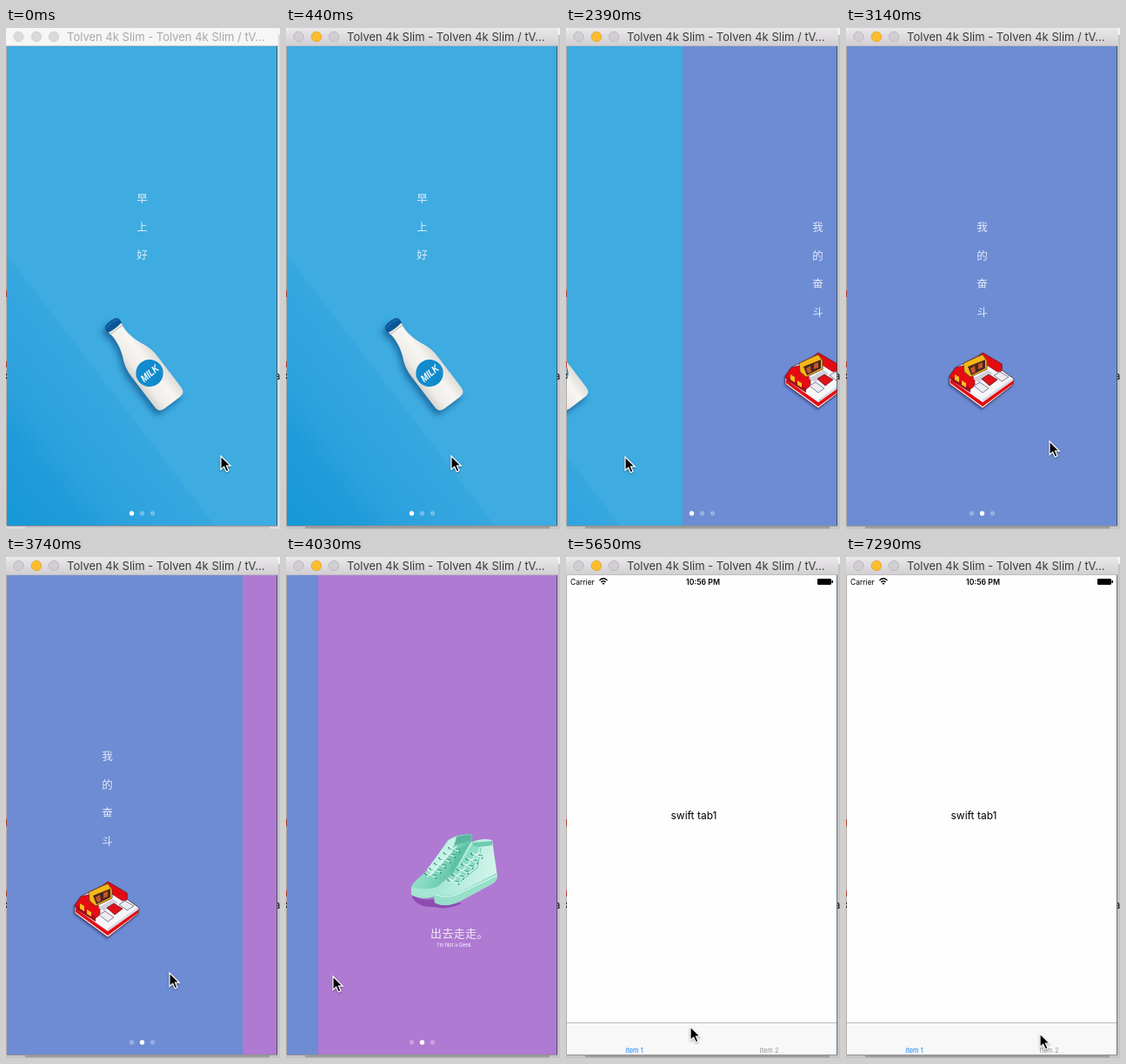
Recreate the animation shown at these times as an HTML page. Size 315 by 577 pixels, loop 8 s.

```html
<!DOCTYPE html>
<html lang="zh">
<head>
<meta charset="utf-8">
<title>Guide pages</title>
<style>
  html, body { margin: 0; width: 100%; height: 100%; overflow: hidden; background: #fff; }
  svg { display: block; width: 100vw; height: 100vh; }
  text { font-family: Inter, "Noto Sans", sans-serif; }
  .cjk { font-family: "Noto Sans CJK SC", "Noto Sans CJK", sans-serif; font-weight: 100; fill: #fff; fill-opacity: .82; }
  .mid { text-anchor: middle; }
  .bottle { filter: drop-shadow(-3px 5px 3px rgba(0, 55, 110, .5)); }
  .console { filter: drop-shadow(-1px 2px 1px rgba(30, 45, 100, .45)); }
  .pointer { filter: drop-shadow(0 1px 1px rgba(0, 0, 0, .35)); }
</style>
</head>
<body>
<svg viewBox="0 0 315 577" preserveAspectRatio="none">
  <defs>
    <clipPath id="screen"><rect x="1" y="21" width="311" height="552"/></clipPath>
    <linearGradient id="bar" x2="0" y2="1">
      <stop stop-color="#eae8ea"/><stop offset="1" stop-color="#d0ced0"/>
    </linearGradient>
    <linearGradient id="sky" gradientUnits="userSpaceOnUse" x1="1" y1="260" x2="-150" y2="376">
      <stop stop-color="#3eabe1"/><stop offset=".01" stop-color="#36a7df"/>
      <stop offset=".34" stop-color="#2fa3de"/><stop offset=".5" stop-color="#2aa0dc"/>
      <stop offset=".64" stop-color="#1f9bd9"/><stop offset="1" stop-color="#1798d7"/>
    </linearGradient>
    <linearGradient id="glass">
      <stop stop-color="#d5d3ce"/><stop offset=".25" stop-color="#efede8"/>
      <stop offset=".65" stop-color="#f8f6f2"/><stop offset="1" stop-color="#dfddd8"/>
    </linearGradient>
    <linearGradient id="mint" x2="1" y2=".6">
      <stop stop-color="#b4eddc"/><stop offset=".5" stop-color="#86dac0"/><stop offset="1" stop-color="#49b194"/>
    </linearGradient>
    <linearGradient id="pale" x2="1" y2=".3">
      <stop stop-color="#96e0c9"/><stop offset=".5" stop-color="#b4ecdc"/><stop offset="1" stop-color="#d3f4ea"/>
    </linearGradient>
  </defs>

  <!-- desktop behind the window -->
  <rect width="315" height="577" fill="#f4f4f4"/>
  <g id="shade">
    <path d="M313 8V577M0 575H315" stroke="#c4c4c4" stroke-width="4"/>
    <path d="M22 575H303" stroke="#9d9d9d" stroke-width="3"/>
  </g>
  <path d="M.5 21V573" stroke="#b5aaa0"/>
  <path d="M.5 302V310M.5 384V391" stroke="#b8402c"/>
  <path d="M.5 398V400M.5 402V404" stroke="#222"/>
  <text x="309" y="405" font-size="11">a</text>

  <!-- title bar -->
  <path id="titleBar" d="M0 21V5Q0 0 5 0H308Q313 0 313 5V21Z"/>
  <path d="M0 20.5H313" stroke="#b9b7b9" stroke-opacity=".7"/>
  <g id="lights"><circle cx="14.5" cy="10"/><circle cx="35" cy="10"/><circle cx="55" cy="10"/></g>
  <text id="title" x="70" y="15" font-size="13">Tolven 4k Slim - Tolven 4k Slim / tV...</text>

  <g clip-path="url(#screen)">
    <g id="pages">
      <g>
        <rect x="1" y="21" width="311" height="552" fill="url(#sky)"/>
        <g data-column="早上好" data-top="196"></g>
        <g class="bottle"><g transform="translate(122 341) rotate(-37.3)">
          <path d="M-9 4H9L8 13Q8 25 13 37Q19 48 19 61V106Q19 114 11 114H-11Q-19 114-19 106V61Q-19 48-13 37Q-8 25-8 13Z" fill="url(#glass)"/>
          <path d="M-9 8H9" stroke="#c9c8c4" stroke-width="1.5"/>
          <path d="M-10 5V0Q-9-4 0-4T10 0V5Q0 7-10 5Z" fill="#0c5796"/>
          <path d="M-9 0Q0-3 9 0" fill="none" stroke="#1d77bb"/>
          <circle cy="71" r="15.7" fill="#118bcd"/>
          <text class="mid" y="75.5" font-size="12" font-weight="700" font-style="italic" fill="#fff" style="font-family:'Liberation Sans',sans-serif" transform="translate(0 71) rotate(-3) scale(.8 1) translate(0 -71)">MILK</text>
        </g></g>
      </g>

      <g transform="translate(311)">
        <rect x="1" y="21" width="311.5" height="552" fill="#6d8cd4"/>
        <g data-column="我的奋斗" data-top="229"></g>
        <g class="console" stroke-linejoin="round">
          <path d="M119 401L126 391L153 377L157 374L179 387V394L193 404L192 411L157 438L119 410Z" fill="#f7f6f9" stroke="#4b2433" stroke-width=".8"/>
          <path d="M120 405L157 431L192 406V410L157 436L120 409Z" fill="#e30d14"/>
          <path d="M157 428L192 403V406L157 431Z" fill="#d9d9e2"/>
          <path d="M152 378L157 374L179 387V395L174 396L154 383Z" fill="#e60b12" stroke="#7d101c" stroke-width=".7"/>
          <path d="M119 401L126 391L135 389L148 404V412L143 416L120 404Z" fill="#e40b12" stroke="#7d101c" stroke-width=".7"/>
          <path d="M121 402L143 415V420L121 406Z" fill="#9c1019"/>
          <path d="M125 399L130 402V408L125 405ZM133 406L138 409V414L133 411Z" fill="#f6c021"/>
          <path d="M135 386L157 376L162 383V393L143 402L136 396Z" fill="#f6b719" stroke="#5d351b" stroke-width=".8"/>
          <path d="M140 390L160 382V392L144 400Z" fill="#4a2520"/>
          <path d="M143 392L148 389L149 396L145 398ZM152 387L157 385V391L152 393Z" fill="#c4572c"/>
          <path d="M146 404L163 394L169 398L153 408Z" fill="#d0d0d9"/>
          <path d="M156 404L164 399L174 405L165 412Z" fill="#df1119" stroke="#65131e" stroke-width=".8"/>
          <path d="M147 412L154 408L164 415L157 420ZM170 400L177 396L187 402L179 407Z" fill="#ececf1" stroke="#75758a" stroke-width=".9"/>
        </g>
      </g>

      <g transform="translate(622)">
        <rect x="1" y="21" width="311" height="552" fill="#af7ad2"/>
        <path d="M108 389Q123 399 145 391L166 399Q149 407 135 403Q113 404 108 389Z" fill="#8c4cb0"/>
        <path d="M108 381C110 372 123 367 131 354L150 326Q163 318 178 319V347L143 388Q123 397 108 389Z" fill="url(#mint)"/>
        <path d="M108 380Q122 385 141 379L142 388Q123 397 108 389Z" fill="#a5e6d2"/>
        <path d="M151 326L161 321L153 342L131 366L126 360Z" fill="#c3f2e6"/>
        <path d="M160 322L177 320V326L158 332Z" fill="#57b69d"/>
        <path d="M162 336L177 330V347L158 367L152 362Z" fill="#5dc1a6"/>
        <path d="M134 388C136 377 148 374 157 363L176 329Q189 323 201 326L207 368Q206 374 200 377L161 398Q145 404 135 398Z" fill="url(#pale)"/>
        <path d="M134 386Q147 393 163 386L206 364Q209 372 200 377L161 398Q145 404 135 398Z" fill="#96dfc9"/>
        <path d="M135 388Q148 395 164 387L206 367" fill="none" stroke="#d7f7ee" stroke-width="1.2"/>
        <path d="M178 329L201 327V332L179 335Z" fill="#6fcab1"/>
        <path d="M177 332L186 334L181 357L160 375L152 369L164 354Z" fill="#8bdcc5"/>
        <path d="M188 335L184 358L164 374" fill="none" stroke="#6cc6ae"/>
        <g data-laces="125 364"></g>
        <g data-laces="151 371"></g>
        <text class="cjk" x="130" y="437.500" font-size="13" letter-spacing=".4">出去走走。</text>
        <text class="mid" x="157" y="449" font-size="5.600" fill="#fff">I'm Not a Geek</text>
      </g>
    </g>

    <g id="start">
      <rect x="126" y="524" width="60" height="23" rx="11.500" fill="#3e97df"/>
      <text class="cjk mid" x="156" y="539.500" font-size="10.700" style="font-weight:400;fill-opacity:1">开始体验</text>
    </g>
    <g id="dots" fill="#fff"><circle cx="144.500" cy="559" r="2.700"/><circle cx="156.500" cy="559" r="2.700"/><circle cx="168.500" cy="559" r="2.700"/></g>

    <g id="tabs">
      <rect x="1" y="21" width="311" height="552" fill="#fefefe"/>
      <text x="5" y="32" font-size="8.500">Carrier</text>
      <g fill="none" stroke="#000" stroke-width="1.300">
        <path d="M38.500 27Q43 22.600 47.500 27M40.300 29Q43 26.400 45.700 29"/>
      </g>
      <path d="M41.500 30.300Q43 29 44.500 30.300L43 32Z"/>
      <text class="mid" x="157.500" y="32" font-size="8.700" font-weight="600">10:56 PM</text>
      <rect x="289" y="25" width="16" height="7" rx="1.300"/><rect x="305.500" y="27" width="1.500" height="3"/>
      <text class="mid" x="147" y="302" font-size="12">swift tab1</text>
      <rect x="1" y="536" width="311" height="37" fill="#f8f8f8"/>
      <path d="M1 536.500H312" stroke="#bdbdbd"/>
      <text class="mid" x="78.500" y="570.500" font-size="7.400" fill="#1583fb">Item 1</text>
      <text class="mid" x="233.500" y="570.500" font-size="7.400" fill="#949494">Item 2</text>
    </g>
  </g>
  <path d="M311.500 21V573" stroke="#33424c" stroke-opacity=".75"/>
  <path d="M1 573.500H312" stroke="#929292"/>

  <g class="pointer"><path id="cursor" d="M0 0V15.500L3.700 12.200L6.300 18L9 16.800L6.500 11.200H11.300Z" fill="#000" stroke="#fff" stroke-width="1.200"/></g>
</svg>
<script>
const LOOP = 8000, PAGE = 311;
const $ = id => document.getElementById(id);

// Each row: start time, then the values held until the next row.
const cursorSteps = [
  [0, 247, 493], [150, 232, 493], [300, 204, 493], [440, 190, 493],
  [2240, 114, 495], [2390, 68, 494], [2540, 74, 491], [2690, 128, 484],
  [2840, 190, 479], [2990, 225, 476], [3140, 234, 476],
  [3740, 188, 479], [3890, 100, 482], [4030, 54, 483], [4170, 66, 484],
  [4310, 128, 486], [4460, 192, 485], [4610, 217, 483],
  [4910, 184, 510], [5060, 143, 541],
  [6850, 165, 543], [7000, 193, 546], [7140, 215, 548], [7290, 223, 549]
];
const scrollSteps = [
  [0, 0], [2240, 64], [2390, 178], [2540, 275], [2690, 303], [2840, PAGE],
  [3740, PAGE + 40], [3890, PAGE + 130], [4030, PAGE + 275], [4170, PAGE + 303], [4310, PAGE * 2]
];
const buttonSteps = [[0, 0], [4310, .3], [4460, .75], [4610, 1]];
const coverSteps = [[0, 552], [5210, 410], [5350, 130], [5500, 24], [5650, 0]];
const focusSteps = [[0, 0], [300, 1]];

const at = (steps, t) => steps.findLast(row => row[0] <= t).slice(1);

for (const column of document.querySelectorAll("[data-column]")) {
  const { column: chars, top } = column.dataset;
  column.innerHTML = [...chars].map((char, i) =>
    `<text class="cjk mid" x="156.5" y="${+top + 4.8 + i * 32.7}" font-size="12.5">${char}</text>`).join("");
}

// Crossed laces climb the instep from the toe, with eyelets on both sides.
for (const laces of document.querySelectorAll("[data-laces]")) {
  const [x, y] = laces.dataset.laces.split(" ").map(Number);
  laces.innerHTML = Array.from({ length: 6 }, (_, i) => `
    <g transform="translate(${x + i * 5.4} ${y - i * 6})" fill="none">
      <path d="M-1 2L12 3" stroke="#3a9a84" stroke-width="1"/>
      <path d="M0 0L11 5M1 4L9-1" stroke="#e0fbf3" stroke-width="1.3"/>
      <path d="M-1 0V1.500M11.500 5V6.500" stroke="#237765" stroke-width="1.400"/>
    </g>`).join("");
}

function setFocus(active) {
  $("titleBar").setAttribute("fill", active ? "url(#bar)" : "#f6f6f6");
  $("title").setAttribute("fill", active ? "#3c3c3c" : "#a9a9a9");
  $("shade").setAttribute("opacity", active ? 1 : .5);
  [...$("lights").children].forEach((light, i) => {
    const lit = active && i === 1;
    light.setAttribute("r", 5.7);
    light.setAttribute("fill", lit ? "#fdbd2e" : active ? "#d0ced0" : "#dadada");
    light.setAttribute("stroke", lit ? "#e0a02b" : active ? "#b5b3b5" : "#cfcfcf");
    light.setAttribute("stroke-width", .8);
  });
}

function draw(t) {
  const [x, y] = at(cursorSteps, t), [scroll] = at(scrollSteps, t), [cover] = at(coverSteps, t);
  const current = Math.floor(scroll / PAGE);
  $("cursor").setAttribute("transform", `translate(${x} ${y})`);
  $("pages").setAttribute("transform", `translate(${-scroll})`);
  $("tabs").setAttribute("transform", `translate(0 ${cover})`);
  $("start").setAttribute("opacity", at(buttonSteps, t)[0]);
  [...$("dots").children].forEach((dot, i) => dot.setAttribute("opacity", i === current ? 1 : .3));
  setFocus(at(focusSteps, t)[0]);
}

const begin = performance.now();
function tick() {
  draw((performance.now() - begin) % LOOP);
  requestAnimationFrame(tick);
}
tick();
</script>
</body>
</html>
```
